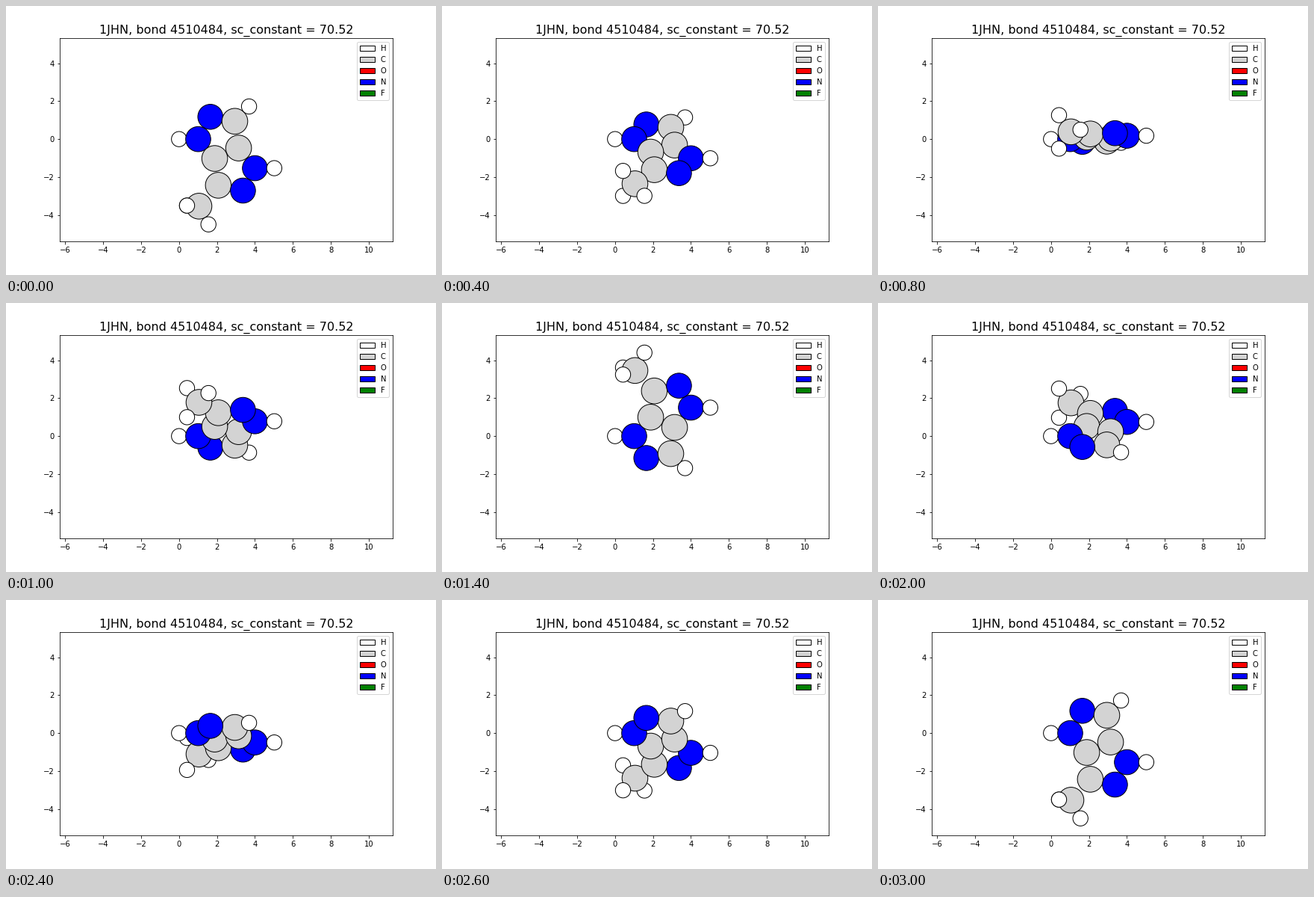
A matplotlib script for the animation above (3.2 s loop, 576x360 px).

```python
import numpy as np
import matplotlib.pyplot as plt
from matplotlib.animation import FuncAnimation
from matplotlib.patches import Circle

FRAMES = 16
INTERVAL = 200

STYLE = {  # element: (colour, radius)
    "H": ("white", 0.40),
    "C": ("lightgray", 0.68),
    "O": ("red", 0.64),
    "N": ("blue", 0.66),
    "F": ("green", 0.60),
}

ATOMS = [  # element, x, y, z
    ("H", 0.00, 0.00, 0.00),
    ("N", 1.01, 0.00, 0.00),
    ("N", 1.65, 1.175, 0.02),
    ("C", 2.94, 0.94, 0.01),
    ("C", 3.14, -0.47, 0.00),
    ("C", 1.88, -1.02, 0.00),
    ("C", 2.07, -2.43, -0.02),
    ("N", 3.37, -2.71, -0.03),
    ("N", 4.00, -1.53, -0.02),
    ("C", 1.05, -3.53, -0.015),
    ("H", 3.69, 1.72, 0.01),
    ("H", 5.02, -1.53, -0.02),
    ("H", 0.42, -3.50, -0.90),
    ("H", 0.42, -3.50, 0.87),
    ("H", 1.55, -4.49, -0.025),
]

plt.rcParams["font.family"] = "DejaVu Sans"
fig = plt.figure(figsize=(8, 5), dpi=72, facecolor="white")
ax = fig.add_axes([0.125, 0.125, 0.775, 0.755])

unit = 25.41  # pixels per data unit
half_w, half_h = 223.2 / unit, 135.9 / unit
ax.set_xlim(2.495 - half_w, 2.495 + half_w)
ax.set_ylim(-0.037 - half_h, -0.037 + half_h)
ax.set_xticks(range(-6, 11, 2))
ax.set_yticks(range(-4, 5, 2))
ax.set_title("1JHN, bond 4510484, sc_constant = 70.52", fontsize=16)


def ball(element, x=0, y=0):
    color, radius = STYLE[element]
    return Circle((x, y), radius, facecolor=color, edgecolor="black", linewidth=1)


ax.legend([ball(e) for e in STYLE], list(STYLE), loc="upper right")

balls = [ax.add_patch(ball(e, x, y)) for e, x, y, _ in ATOMS]
X, Y, Z = np.array([a[1:] for a in ATOMS]).T


def update(i):
    # Turn about the x axis; the last step closes the full circle.
    angle = 2 * np.pi * i / (FRAMES - 1)
    y = Y * np.cos(angle) - Z * np.sin(angle)
    depth = Y * np.sin(angle) + Z * np.cos(angle)
    order = np.argsort(-np.round(depth, 6), kind="stable")
    for rank, k in enumerate(order):
        balls[k].center = (X[k], y[k])
        balls[k].set_zorder(1 + rank / 100)
    return balls


anim = FuncAnimation(fig, update, frames=FRAMES, interval=INTERVAL,
                     repeat=True, repeat_delay=0, blit=False)
plt.show()
```
